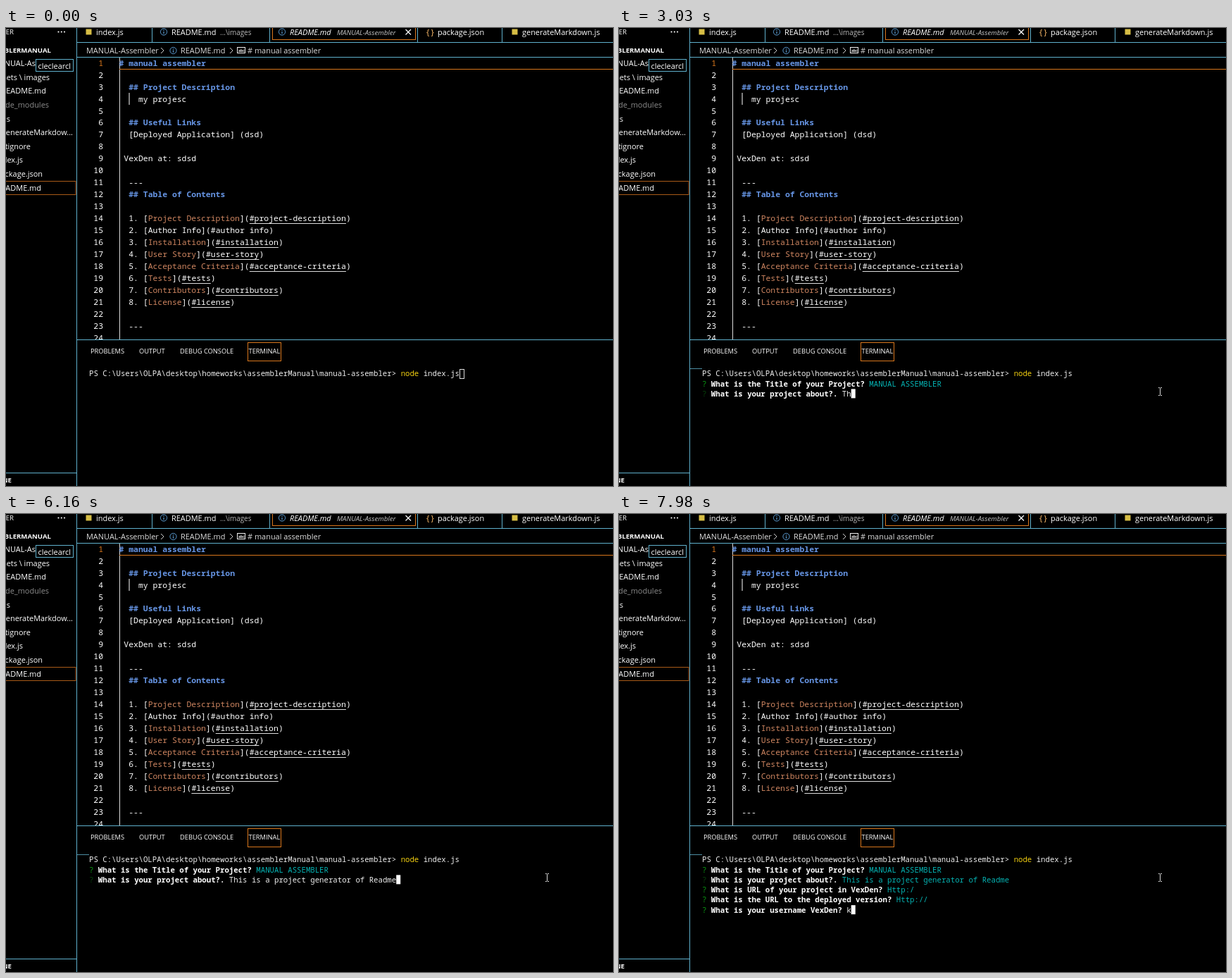
Write an HTML page that moves like this. It is 862 px wide and 650 px high and loops after 8 s.

```html
<!DOCTYPE html>
<html lang="en">
<head>
<meta charset="utf-8">
<title>Editor with terminal</title>
<style>
  html, body { margin: 0; width: 100%; height: 100%; overflow: hidden; background: #000; }
  svg { display: block; width: 862px; height: 650px; background: #000; }
  text { white-space: pre; fill: #fff; }
  .ui { font-family: "Open Sans", "Noto Sans", sans-serif; }
  .code { font-family: "Noto Sans Mono", monospace; font-size: 11.43px; }
  .term { font-family: "Noto Sans Mono", monospace; font-size: 10.69px; }
</style>
</head>
<body>
<svg id="stage" viewBox="0 0 862 650">
  <defs><clipPath id="editorClip"><rect x="100" y="41" width="762" height="401"/></clipPath></defs>
</svg>
<script>
const LOOP = 8000;
const BLUE = '#5fb0cc', ORANGE = '#d8761c', HEAD = '#6796e6', LINK = '#ce8560';
const CYAN = '#05b3b3', GREEN = '#0a9a12', DIM = '#06420a';
const stage = document.getElementById('stage');

function add(tag, attrs, parent = stage, content) {
  const el = document.createElementNS('http://www.w3.org/2000/svg', tag);
  for (const k in attrs) el.setAttribute(k, attrs[k]);
  if (content !== undefined) el.textContent = content;
  return parent.appendChild(el);
}
const line = (d, stroke, parent, w = 1) =>
  add('path', { d, stroke, fill: 'none', 'stroke-width': w }, parent);
const box = (x, y, w, h, stroke) =>
  add('rect', { x, y, width: w, height: h, fill: 'none', stroke });
const ui = (x, y, s, size = 10.95, style = '') =>
  add('text', { x, y, class: 'ui', style: `font-size:${size}px;${style}` }, stage, s);

function infoIcon(x, y) {
  add('circle', { cx: x, cy: y, r: 4.6, fill: 'none', stroke: '#5b9bd0' });
  line(`M${x} ${y - 2.8}v1.3M${x} ${y - .6}v3.4`, '#5b9bd0', stage, 1.2);
}
const chevron = (x, y) => line(`M${x - 2} ${y - 4}l4 4l-4 4`, '#ccc');

// Side bar
function drawSidebar() {
  const end = 'text-anchor:end;';
  ui(11, 9, 'EXPLORER', 9.6, end);
  for (const x of [74.5, 78.8, 83]) add('circle', { cx: x, cy: 5.5, r: 1.1, fill: '#fff' });
  ui(64, 35, 'ASSEMBLERMANUAL', 9.6, end + 'font-weight:700');
  ui(42, 54, 'MANUAL-As', 10.95, end);
  const files = [
    ['assets \\ images', 62], ['README.md', 57], ['node_modules', 61], ['utils', 6],
    ['generateMarkdow...', 95], ['tignore', 35], ['index.js', 24], ['package.json', 52], ['README.md', 50]
  ];
  files.forEach(([name, x], i) =>
    ui(x, 73.7 + i * 19.6, name, 10.95, end + (i === 2 ? 'fill:#8c8c8c' : '')));
  box(-1, 217.5, 100, 19, '#a85a18');
  add('rect', { x: 42.5, y: 44.5, width: 53, height: 17, fill: '#000', stroke: BLUE });
  ui(45.5, 57.5, 'cleclearcl');
  line('M0 631.5H100', BLUE);
  ui(8, 645, 'OUTLINE', 9.6, end + 'font-weight:700');
}

// Tabs and breadcrumb
function drawTabs() {
  line('M100.5 0V650M100 20.5H862M207.5 0V20M374.5 0V20M584.5 0V20M704.5 0V20M100 41.5H862M100 442.5H862', BLUE);
  box(378.5, -2, 203, 18.5, ORANGE);
  for (const x of [113.5, 718.5]) add('rect', { x, y: 1.5, width: 8, height: 8, fill: '#d6bd45' });
  ui(128, 10, 'index.js');
  infoIcon(224, 5.5);
  ui(235, 10, 'README.md');
  ui(304, 10, '...\\images', 9.9, 'fill:#b8b8b8');
  infoIcon(392, 5.5);
  ui(403, 10, 'README.md', 10.95, 'font-style:italic');
  ui(470, 10, 'MANUAL-Assembler', 9.7, 'font-style:italic;fill:#c4c4c4');
  line('M567.5 2l7.5 7.5M575 2l-7.5 7.5', '#fff', stage, 1.2);
  ui(597, 9.5, '{ }', 10.5, 'fill:#d9a05a;font-weight:600');
  ui(613, 10, 'package.json');
  ui(733, 10, 'generateMarkdown.js');

  ui(114, 36.3, 'MANUAL-Assembler', 10.95, 'fill:#ddd');
  chevron(222, 32);
  infoIcon(237.5, 32);
  ui(248, 36.3, 'README.md', 10.95, 'fill:#ddd');
  chevron(320, 32);
  box(328.5, 27.5, 11, 8, '#eee');
  ui(330, 33.5, 'abc', 5, 'font-weight:700');
  ui(343, 36.3, '# manual assembler', 10.95, 'fill:#ddd');
}

// Editor
function drawEditor() {
  const g = add('g', { 'clip-path': 'url(#editorClip)' });
  const cw = 6.86, left = 160.5;
  const base = row => 53.7 + (row - 1) * 16.95;
  const put = (row, col, s, fill = '#fff', weight = 400) =>
    add('text', { x: left + col * cw, y: base(row), class: 'code', style: `fill:${fill};font-weight:${weight}` }, g, s);

  line('M161.5 42V442', '#ddd', g);
  line('M161 58.5H862', ORANGE, g);
  for (let n = 1; n <= 24; n++)
    add('text', { x: 138, y: base(n), class: 'code', style: `text-anchor:end;fill:${n === 1 ? ORANGE : '#fff'}` }, g, n);

  put(1, 0, '# manual assembler', HEAD, 700);
  put(3, 2, '## Project Description', HEAD, 700);
  line('M175 92V109', '#fff', g);
  put(4, 4, 'my projesc');
  put(6, 2, '## Useful Links', HEAD, 700);
  put(7, 2, '[Deployed Application] (dsd)');
  put(9, 1, 'VexDen at: sdsd');
  put(11, 2, '---');
  put(12, 2, '## Table of Contents', HEAD, 700);
  put(23, 2, '---');

  const toc = ['Project Description', 'Author Info', 'Installation', 'User Story',
    'Acceptance Criteria', 'Tests', 'Contributors', 'License'];
  toc.forEach((title, i) => {
    const row = 14 + i, plain = i === 1;
    const anchor = '#' + (plain ? 'author info' : title.toLowerCase().replace(' ', '-'));
    const open = 6 + title.length, from = open + 2, to = from + anchor.length;
    put(row, 2, `${i + 1}. [`);
    put(row, 6, title, plain ? '#fff' : LINK);
    put(row, open, '](');
    put(row, from, anchor);
    put(row, to, ')');
    if (!plain) {
      const y = Math.round(base(row) + 3) + .5;
      line(`M${left + from * cw} ${y}H${left + to * cw}`, '#ddd', g);
    }
  });
}

// Terminal
const TW = 6.415, TX = 118;
const rowY = r => 494.4 + r * 14.27;
const tput = (row, col, s, fill, weight = 400) =>
  add('text', { x: TX + col * TW, y: rowY(row), class: 'term', style: `fill:${fill};font-weight:${weight}` }, stage, s);

function drawPanel() {
  [['PROBLEMS', 120], ['OUTPUT', 189], ['DEBUG CONSOLE', 247], ['TERMINAL', 344.5]]
    .forEach(([s, x]) => ui(x, 462.3, s, 9.3));
  box(343.5, 446.5, 47, 26, ORANGE);
  tput(0, 0, 'PS C:\\Users\\OLPA\\desktop\\homeworks\\assemblerManual\\manual-assembler>', '#eee', 500);
  tput(0, 69, 'node', '#f2cf10', 500);
  tput(0, 74, 'index.js', '#eee', 500);
}

drawSidebar();
drawTabs();
drawEditor();
drawPanel();

// keys: [time, letters typed]; dim: spans in which the mark is dark
const prompts = [
  { q: 'What is the Title of your Project?', a: 'MANUAL ASSEMBLER', show: 970, done: 2720,
    keys: [[960, 0], [1130, 2], [2414, 14], [2628, 16]], dim: [[970, 1680]] },
  { q: 'What is your project about?.', a: 'This is a project generator of Readme', show: 2740, done: 6260,
    keys: [[2790, 0], [3000, 2], [4150, 13], [5000, 23], [5870, 34], [6130, 37]], dim: [[2740, 3360], [5100, LOOP]] },
  { q: 'What is URL of your project in VexDen?', a: 'Http:/', show: 6300, done: 7000,
    keys: [[6380, 0], [6930, 6]], dim: [[6300, 6800]] },
  { q: 'What is the URL to the deployed version?', a: 'Http://', show: 7020, done: 7770,
    keys: [[7030, 0], [7400, 4], [7510, 5], [7720, 7]], dim: [[7020, 7600]] },
  { q: 'What is your username VexDen?', a: 'k', show: 7790, done: Infinity,
    keys: [[7800, 0], [7900, 1]], dim: [] }
];
prompts.forEach((p, i) => {
  p.col = p.q.length + 3;
  p.mark = tput(i + 1, 0, '?', GREEN);
  p.ask = tput(i + 1, 2, p.q, '#fff', 700);
  p.reply = tput(i + 1, p.col, '', '#eee');
});

const caret = add('rect', { width: 6, height: 13 });
const focusLine = line('M101 483.5H118', '#4d8da3');
const mouse = line('M-2.5 -5.5H-.8L0 -4.7L.8 -5.5H2.5M0 -4.7V4.7M-2.5 5.5H-.8L0 4.7L.8 5.5H2.5', '#ddd');

// Piecewise linear value from [time, value] points
function along(points, t) {
  if (t <= points[0][0]) return points[0][1];
  for (let i = 1; i < points.length; i++) {
    const [t0, v0] = points[i - 1], [t1, v1] = points[i];
    if (t < t1) return v0 + (v1 - v0) * (t - t0) / (t1 - t0);
  }
  return points[points.length - 1][1];
}
const ease = u => u * u * (3 - 2 * u);
const show = (el, on) => el.setAttribute('visibility', on ? 'visible' : 'hidden');

function render(t) {
  let row = 0, col = 82;
  if (t >= 900) { row = 1; col = 0; }

  prompts.forEach((p, i) => {
    const on = t >= p.show;
    [p.mark, p.ask, p.reply].forEach(el => show(el, on));
    if (!on) return;
    const n = Math.floor(along(p.keys, t) + 1e-6);
    p.reply.textContent = p.a.slice(0, n);
    p.reply.style.fill = t >= p.done ? CYAN : '#eee';
    p.mark.style.fill = p.dim.some(([a, b]) => t >= a && t < b) ? DIM : GREEN;
    row = t >= p.done ? i + 2 : i + 1;
    col = t >= p.done ? 0 : p.col + n;
  });

  const focused = t >= 700;
  caret.setAttribute('x', TX + col * TW + (focused ? 0 : .5));
  caret.setAttribute('y', focused ? 483.8 + row * 14.27 : 484.5);
  caret.setAttribute('fill', focused ? '#fff' : 'none');
  caret.setAttribute('stroke', focused ? 'none' : '#ddd');
  show(focusLine, focused);

  const enter = ease(along([[30, 0], [640, 1]], t));
  const lift = ease(along([[2560, 0], [2900, 1]], t));
  mouse.setAttribute('transform', `translate(${868 - 99.5 * enter} ${650 - 120 * enter - 14 * lift})`);
  show(mouse, t >= 30);
}

function tick() {
  render(performance.now() % LOOP);
  requestAnimationFrame(tick);
}
tick();
</script>
</body>
</html>
```
